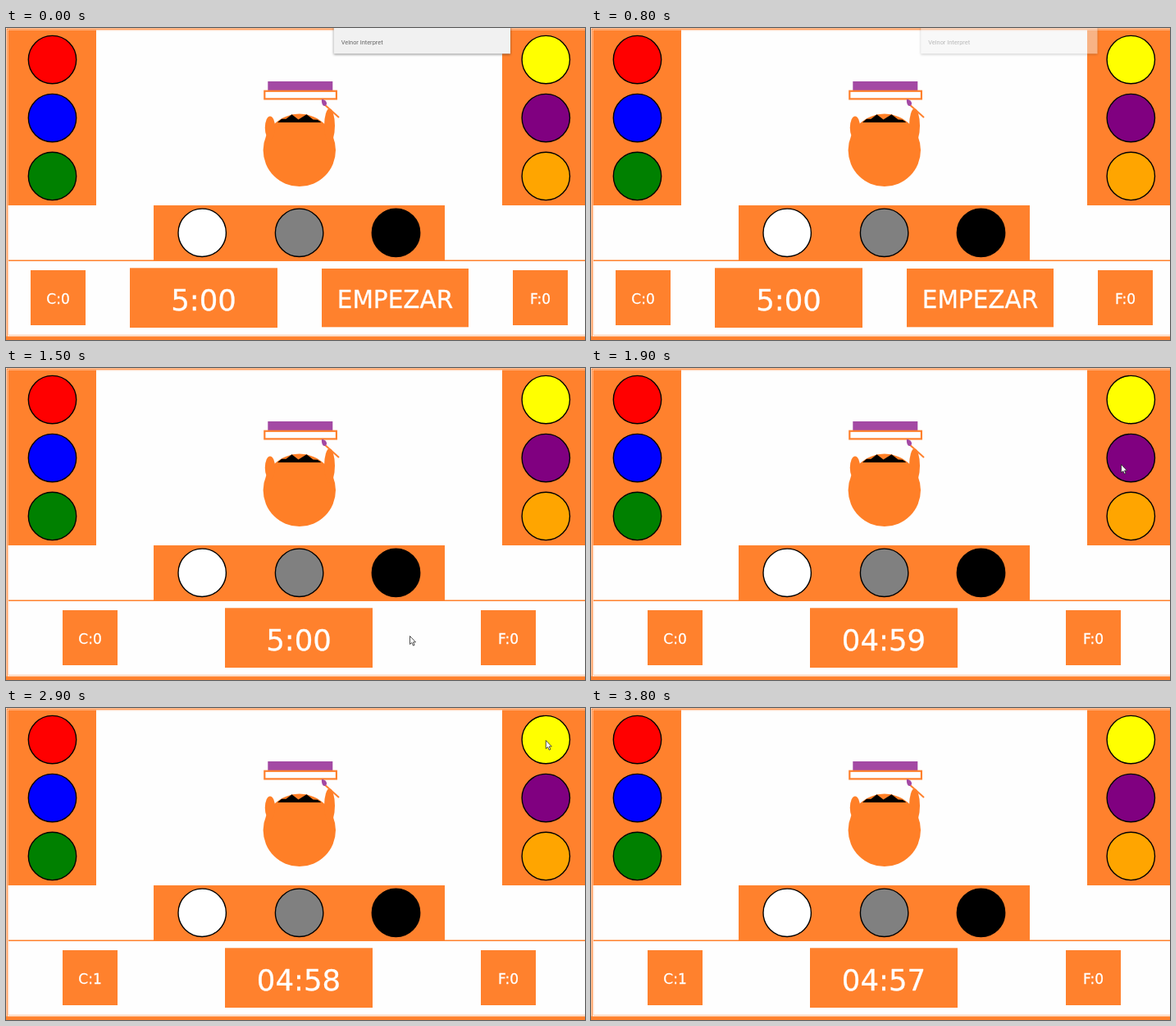
An HTML page for the animation above (4 s loop, 706 by 380 pixels).

```html
<!DOCTYPE html>
<html lang="es">
<head>
<meta charset="utf-8">
<title>Juego de colores</title>
<style>
  html, body { margin: 0; width: 100%; height: 100%; overflow: hidden; background: #fefefe; }
  svg { display: block; width: 706px; height: 380px; }
  .panel { fill: #ff812d; }
  .line { fill: none; stroke: #ff812d; }
  .cat { fill: #ff7f27; }
  .violet { fill: #a349a4; }
  .dot { stroke: #000; stroke-width: 1.4; }
  .label { fill: #fff; stroke: #fff; stroke-width: .3; stroke-linejoin: round;
           font-family: "Comic Sans MS", "DejaVu Sans", sans-serif; text-anchor: middle; }
  #popup rect { fill: #f1f1f1; filter: drop-shadow(0 1px 1.5px rgba(0, 0, 0, .45)); }
  #popup text { fill: #666; font: 7.4px Roboto, sans-serif; }
</style>
</head>
<body>
<svg viewBox="0 0 706 380">
  <rect width="706" height="380" fill="#fefefe"/>
  <path class="line" stroke-width="1.2" d="M706 1.1H1.2V376"/>
  <path class="line" stroke-width=".8" opacity=".5" d="M706 2.7H2.8V374H706"/>
  <path class="line" stroke-width="1.5" d="M3 283.3H706"/>
  <rect class="panel" y="375.5" width="706" height="4.5"/>
  <rect class="panel" x="2.5" y="2.5" width="107.5" height="213.5"/>
  <rect class="panel" x="605" y="2.5" width="101" height="213.5"/>
  <rect class="panel" x="180" y="216" width="355" height="67"/>
  <g id="dots"></g>

  <rect class="violet" x="319.3" y="65" width="79" height="11.5"/>
  <rect class="line" x="315.3" y="76.8" width="87.6" height="9.6" stroke-width="2.2"/>
  <g class="cat">
    <circle cx="357.8" cy="148.8" r="44.2"/>
    <ellipse cx="322" cy="121.5" rx="6.2" ry="14"/>
    <ellipse cx="394.5" cy="119" rx="6.5" ry="21"/>
  </g>
  <path d="M331 115L336 110.8H341.5L348.5 105.2L356.5 111.6L366.5 105.2L374.5 111.4L380 111.8L384.5 115Z"/>
  <path class="line" stroke-width="2" d="M387 92L406 109"/>
  <path class="violet" d="M385 86.5Q391.5 88 391 92.5Q390 96 386.8 94.6Q384.4 92 385 86.5Z"/>

  <g id="correct"><rect class="panel" x="-33.5" y="295" width="67" height="67"/>
    <text class="label" y="336" font-size="17"></text></g>
  <g id="timer"><rect class="panel" x="-90" y="292.3" width="180" height="72.7"/>
    <text class="label" y="344" font-size="35.5"></text></g>
  <g id="start"><rect class="panel" x="385" y="293" width="179" height="71.3"/>
    <text class="label" x="474.5" y="341" font-size="29.5">EMPEZAR</text></g>
  <g id="failed"><rect class="panel" x="-33.5" y="295" width="67" height="67"/>
    <text class="label" y="336" font-size="17">F:0</text></g>

  <g id="popup"><rect x="399.7" y="-4" width="215.3" height="35.3"/>
    <text x="408.8" y="20">Velnor Interpret</text></g>
  <path id="cursor" d="M0 0V10L2.3 8L4 11.6L5.6 10.9L4 7.4H7Z"
        fill="#fff" stroke="#222" stroke-width=".8"/>
</svg>
<script>
const LOOP = 4000;
const el = id => document.getElementById(id);

// Palette: [x, y, colour]
const dots = [
  [56.5, 38.6, 'red'], [56.5, 109.6, 'blue'], [56.5, 180.4, 'green'],
  [658.3, 38.6, 'yellow'], [658.3, 109.6, 'purple'], [658.3, 180.4, 'orange'],
  [239.2, 249.3, 'white'], [357.6, 249.3, 'gray'], [475.5, 249.3, 'black']
];
el('dots').innerHTML = dots.map(([x, y, fill]) =>
  `<circle class="dot" cx="${x}" cy="${y}" r="29.2" fill="${fill}"/>`).join('');

// Step tables: [start in ms, ...values]
const clock = [[0, '5:00'], [1900, '04:59'], [2900, '04:58'], [3800, '04:57']];
const score = [[0, 'C:0'], [2700, 'C:1']];
const layout = [[0, 63.5, 241, 651.5], [900, 102.5, 357, 612.5]];
const popup = [[0, 1, 0], [800, .45, 2.5], [900, .1, 0], [1000, .04, 0], [1100, 0, 0]];
const pointer = [
  [0], [1000, 492.5, 326.5], [1700, 520, 290], [1800, 598, 190],
  [1900, 646.5, 117.5], [2100, 648, 122], [2200, 648, 124],
  [2300, 654, 88], [2400, 659, 50], [2500, 658.3, 39.5],
  [3000, 652, 22], [3100, 647, 5], [3200]
];

const at = (table, t) => table.findLast(step => step[0] <= t).slice(1);
const move = (node, x, y = 0) => node.setAttribute('transform', `translate(${x} ${y})`);
const show = (node, visible) => { node.style.display = visible ? '' : 'none'; };
const write = (id, text) => { el(id).querySelector('text').textContent = text; };

function draw(t) {
  const [correctX, timerX, failedX] = at(layout, t);
  move(el('correct'), correctX);
  move(el('timer'), timerX);
  move(el('failed'), failedX);
  show(el('start'), t < 900);
  write('timer', at(clock, t)[0]);
  write('correct', at(score, t)[0]);

  const [opacity, shift] = at(popup, t);
  el('popup').style.opacity = opacity;
  move(el('popup'), shift);

  const [x, y] = at(pointer, t);
  show(el('cursor'), x !== undefined);
  if (x !== undefined) move(el('cursor'), x, y);
}

const begin = performance.now();
function tick() {
  draw((performance.now() - begin) % LOOP);
  requestAnimationFrame(tick);
}
tick();
</script>
</body>
</html>
```
